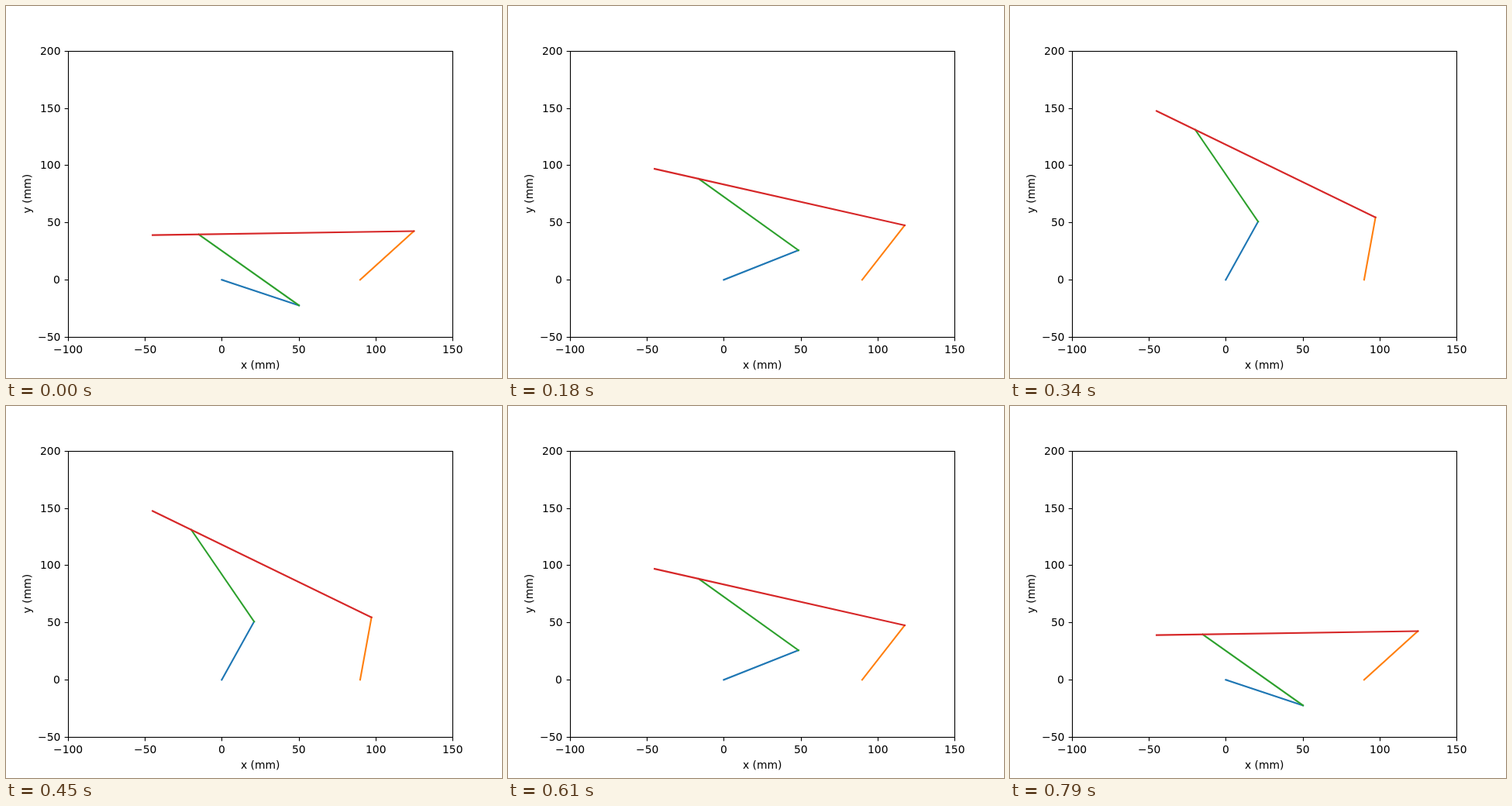
Write an HTML page with a canvas that moves like this. It is 640 by 480 pixels and loops after 810 ms.

```html
<!DOCTYPE html>
<html lang="en">
<head>
<meta charset="utf-8">
<title>Linkage</title>
<style>
  html, body { margin: 0; width: 100%; height: 100%; overflow: hidden; background: #fff; }
  canvas { display: block; }
</style>
</head>
<body>
<canvas id="stage" width="640" height="480"></canvas>
<script>
const ctx = document.getElementById('stage').getContext('2d');
const LOOP = 810, STEP = 20, LAST = 19, FALL_START = 430;
const LEFT = 80, RIGHT = 576, TOP = 57.6, BOTTOM = 427.2;
const FONT = '13.889px "DejaVu Sans", sans-serif';
const CRANK_PIVOT = [0, 0], ROCKER_PIVOT = [90, 0];

const toX = x => LEFT + (x + 100) * (RIGHT - LEFT) / 250;
const toY = y => BOTTOM - (y + 50) * (BOTTOM - TOP) / 250;
const snap = v => Math.floor(v + 0.5) + 0.5;

function line(x1, y1, x2, y2) {
  ctx.beginPath();
  ctx.moveTo(x1, y1);
  ctx.lineTo(x2, y2);
  ctx.stroke();
}

function label(text, x, y, align) {
  const width = ctx.measureText(text).width;
  ctx.fillText(text, Math.round(x - width * align), Math.round(y));
}

function drawAxes() {
  ctx.strokeStyle = ctx.fillStyle = '#000';
  ctx.lineWidth = 1.111;
  ctx.lineCap = 'butt';
  ctx.font = FONT;
  const left = snap(LEFT), top = snap(TOP), bottom = snap(BOTTOM);
  ctx.strokeRect(left, top, snap(RIGHT) - left, bottom - top);

  const name = v => String(v).replace('-', '\u2212');
  for (let v = -100; v <= 150; v += 50) {
    line(snap(toX(v)), bottom, snap(toX(v)), bottom + 4.86);
    label(name(v), toX(v), 448, 0.5);
  }
  for (let v = -50; v <= 200; v += 50) {
    line(left - 4.86, snap(toY(v)), left, snap(toY(v)));
    label(name(v), 70.3, toY(v) + 5, 1);
  }
  label('x (mm)', 328, 468, 0.5);
  ctx.save();
  ctx.translate(32, 242.4);
  ctx.rotate(-Math.PI / 2);
  label('y (mm)', 0, 0, 0.5);
  ctx.restore();
}

// Intersection of two circles, on the left of the direction p to q.
function meet(p, r, q, s) {
  const dx = q[0] - p[0], dy = q[1] - p[1], d = Math.hypot(dx, dy);
  const along = (r * r - s * s + d * d) / (2 * d);
  const side = Math.sqrt(r * r - along * along);
  return [p[0] + (along * dx - side * dy) / d, p[1] + (along * dy + side * dx) / d];
}

function bar(color, p, q) {
  ctx.strokeStyle = color;
  line(toX(p[0]), toY(p[1]), toX(q[0]), toY(q[1]));
}

function drawLinkage(step) {
  // The tip rises along a vertical line; the lowest pose sits slightly below the even spacing.
  const tip = [-45, step ? 40 + 120 * step / LAST : 39];
  const rocker = meet(tip, 170, ROCKER_PIVOT, 55);
  const joint = tip.map((v, i) => v + (rocker[i] - v) * 30 / 170);
  const crank = meet(joint, 90, CRANK_PIVOT, 55);

  ctx.lineWidth = 2.083;
  ctx.lineCap = 'square';
  bar('#1f77b4', CRANK_PIVOT, crank);
  bar('#ff7f0e', ROCKER_PIVOT, rocker);
  bar('#2ca02c', crank, joint);
  bar('#d62728', rocker, tip);
}

function stepAt(time) {
  if (time < FALL_START) return Math.min(LAST, Math.floor(time / STEP));
  return Math.max(0, LAST - 1 - Math.floor((time - FALL_START) / STEP));
}

function draw(time) {
  ctx.fillStyle = '#fff';
  ctx.fillRect(0, 0, 640, 480);
  drawAxes();
  drawLinkage(stepAt(time % LOOP));
}

const start = performance.now();
function tick() {
  draw(performance.now() - start);
  requestAnimationFrame(tick);
}
tick();
</script>
</body>
</html>
```
